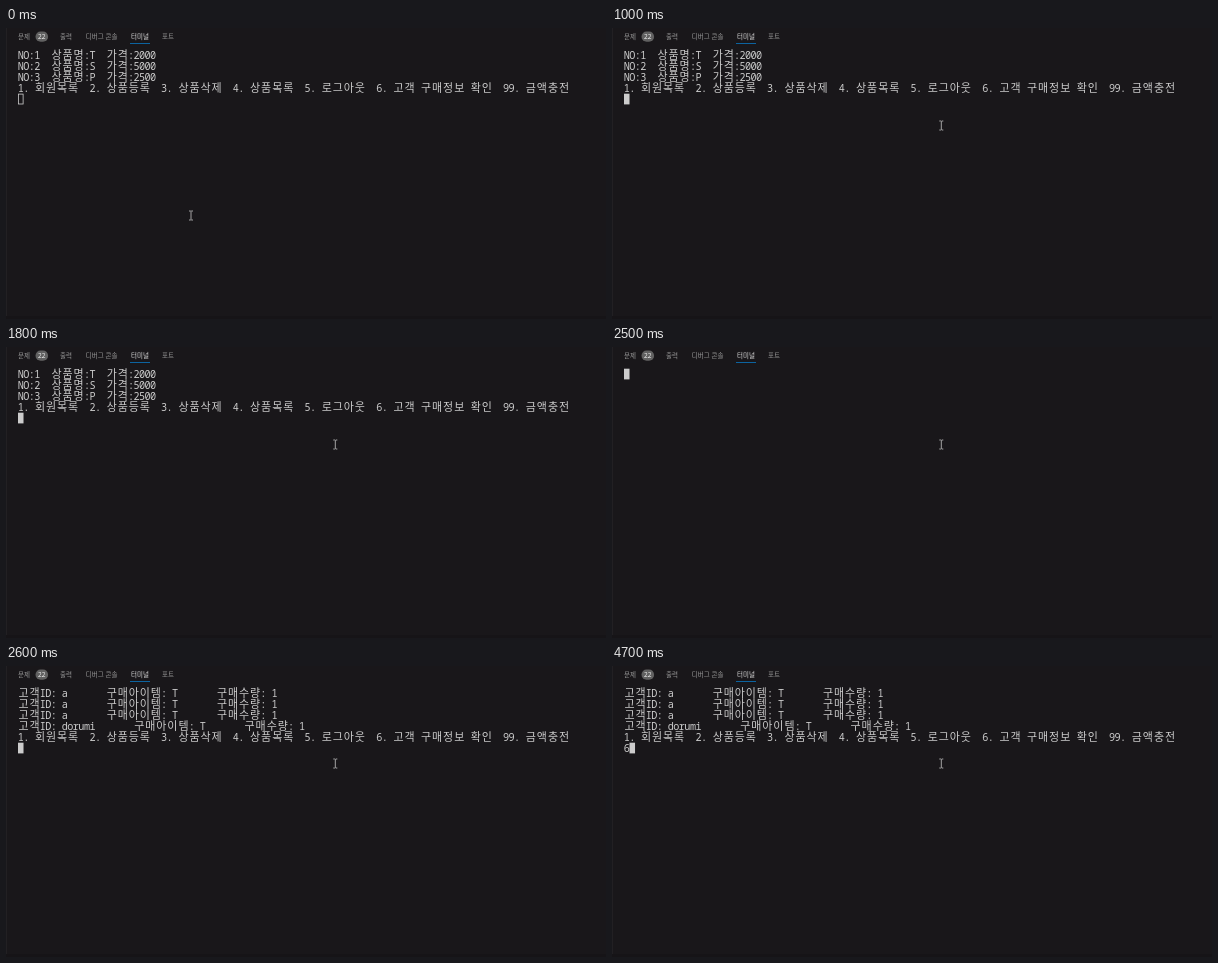
An HTML page for the animation above (5 s loop, 600 by 291 pixels).

```html
<!DOCTYPE html>
<html lang="ko">
<head>
<meta charset="utf-8">
<style>
  html, body { margin: 0; width: 100%; height: 100%; overflow: hidden; background: #19171a; }
  svg { display: block; width: 100%; height: 100%; }
  text { white-space: pre; }
  .tab { font: 6.5px "Noto Sans CJK KR", "Noto Sans CJK", sans-serif; fill: #9a9a9a; }
  .tab.on { fill: #e4e4e4; }
  .badge { font: 6.5px "Open Sans", sans-serif; fill: #f4f4f4; text-anchor: middle; }
  .hangul, .latin { fill: #cccccc; text-anchor: middle; }
  .hangul { font: 11px "Noto Sans Mono CJK KR", "Noto Sans CJK KR", "Noto Sans CJK", monospace; }
  .latin { font: 10.2px "Noto Sans Mono", "DejaVu Sans Mono", monospace; }
</style>
</head>
<body>
<svg viewBox="0 0 600 291">
  <rect width="600" height="291" fill="#19171a"/>
  <rect width="1" height="291" fill="#222023"/>
  <rect y="288" width="600" height="3" fill="#161417"/>
  <g id="tabs"></g>
  <rect x="29.5" y="3.6" width="12.6" height="10.2" rx="5.1" fill="#616161"/>
  <text class="badge" x="35.8" y="11.1">22</text>
  <rect x="124" y="15" width="20" height="1" fill="#0c639f"/>
  <g id="rows"></g>
  <rect id="caret"/>
  <path id="mouse" d="M-2 -4.5H-.6L0 -4L.6 -4.5H2M0 -4V4M-2 4.5H-.6L0 4L.6 4.5H2" fill="none" stroke="#c8c8c8" stroke-width=".8"/>
</svg>
<script>
const LOOP = 5000, STEP = 100;
const LEFT = 12, CELL = 5.515, LINE = 11, TOP = 21.7;
const $ = id => document.getElementById(id);

function add(parent, name, attrs, content = '') {
  const el = document.createElementNS('http://www.w3.org/2000/svg', name);
  for (const key in attrs) el.setAttribute(key, attrs[key]);
  el.textContent = content;
  parent.appendChild(el);
}

const menu = '1. 회원목록  2. 상품등록  3. 상품삭제  4. 상품목록  5. 로그아웃  6. 고객 구매정보 확인  99. 금액충전';
const product = (no, name, price) => `NO:${no}  상품명:${name}  가격:${price}`;
const gap = ' '.repeat(7);
const order = id => `고객ID: ${id}${gap}구매아이템: T${gap}구매수량: 1`;

const products = [product(1, 'T', 2000), product(2, 'S', 5000), product(3, 'P', 2500), menu];
const orders = [...['a', 'a', 'a', 'dorumi'].map(order), menu];

// Terminal grid: Hangul takes two cells, everything else one; glyphs are centred.
function addLine(line, row) {
  let col = 0;
  for (const run of line.match(/[가-힣]+|[^가-힣]+/g) || []) {
    const wide = /[가-힣]/.test(run);
    const span = wide ? 2 : 1;
    const x = [...run].map((_, i) => (LEFT + (col + (i + 0.5) * span) * CELL).toFixed(2)).join(' ');
    add($('rows'), 'text', { class: wide ? 'hangul' : 'latin', x, y: TOP + 9.4 + row * LINE }, run);
    col += run.length * span;
  }
}

let shown = null;
function showRows(lines) {
  const key = lines.join('\n');
  if (key === shown) return;
  shown = key;
  $('rows').replaceChildren();
  lines.forEach(addLine);
}

function showCaret(col, row, focused) {
  const inset = focused ? 0 : 0.4;
  const attrs = {
    x: LEFT + col * CELL + inset, y: TOP + row * LINE + inset,
    width: CELL - 2 * inset, height: LINE - 0.3 - 2 * inset,
    fill: focused ? '#cccccc' : 'none',
    stroke: focused ? 'none' : '#cccccc', 'stroke-width': 0.8
  };
  for (const key in attrs) $('caret').setAttribute(key, attrs[key]);
}

function screenAt(t) {
  if (t < 2400) return { lines: products, input: '' };
  if (t < 2500) return { lines: products, input: '6' };
  if (t < 2600) return { lines: [], input: '' };
  return { lines: orders, input: t < 4700 ? '' : '6' };
}

function draw(time) {
  const t = Math.floor(time % LOOP / STEP) * STEP;
  const { lines, input } = screenAt(t);
  showRows([...lines, input]);
  showCaret(input.length, lines.length, t >= 500);

  const p = Math.min(t / 700, 1);
  const ease = (1 - Math.cos(Math.PI * p)) / 2;
  const x = 185 + 144.3 * ease, y = 187.5 - 90 * ease;
  $('mouse').setAttribute('transform', `translate(${x} ${y})`);
}

[['문제', 12], ['출력', 54], ['디버그 콘솔', 79.7], ['터미널', 125], ['포트', 156]].forEach(([label, x]) =>
  add($('tabs'), 'text', { class: label === '터미널' ? 'tab on' : 'tab', x, y: 11.2 }, label));

const start = performance.now();
function tick() {
  draw(performance.now() - start);
  requestAnimationFrame(tick);
}
tick();
</script>
</body>
</html>
```
